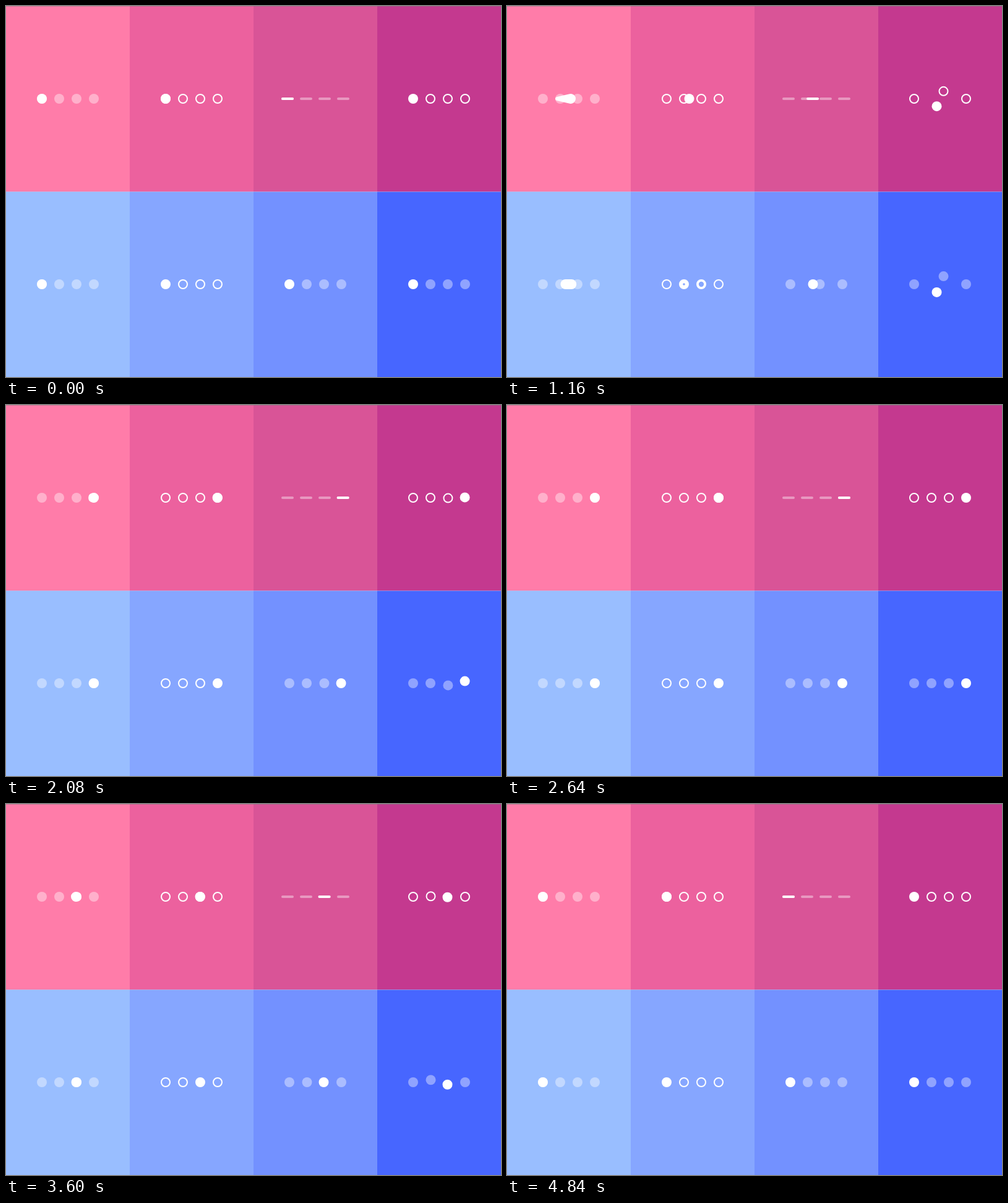
An HTML page for the animation above (4880 ms loop, 800 px wide and 600 px high).

```html
<!DOCTYPE html>
<html lang="en">
<head>
<meta charset="utf-8">
<title>Pager dots</title>
<style>
  html, body { margin: 0; width: 100%; height: 100%; overflow: hidden; }
  svg { display: block; width: 800px; height: 600px; }
</style>
</head>
<body>
<svg id="stage" viewBox="0 0 800 600"></svg>
<script>
const LOOP = 4880, MOVE = 382, GAP = 28, R = 8;
const STARTS = [309, 1019, 1729, 2858, 3568, 4278];
const STOPS = [0, 1, 2, 3, 2, 1, 0];
const UP = [-1, 1, -1, -1, 1, -1];
const COLORS = ['#ff7ca9', '#ec619e', '#d95497', '#c4398f',
                '#99beff', '#86a6ff', '#7391ff', '#4766ff'];
const DIM = { fill: '#fff', 'fill-opacity': 0.4 };
const FULL = { fill: '#fff' };
const RING = { fill: 'none', stroke: '#fff', 'stroke-width': 2 };
const stage = document.getElementById('stage');

function set(el, attrs) {
  for (const k in attrs) el.setAttribute(k, attrs[k]);
  return el;
}
function add(tag, ...attrs) {
  const el = document.createElementNS('http://www.w3.org/2000/svg', tag);
  attrs.forEach(a => set(el, a));
  return stage.appendChild(el);
}
const spot = (panel, i) => (panel % 4) * 200 + 58 + i * GAP;
const row = panel => panel < 4 ? 150 : 450;
const dot = (panel, i, style) =>
  add('circle', { cx: spot(panel, i), cy: row(panel), r: style === RING ? R - 1 : R }, style);
const dots = (panel, style, n = 4) =>
  Array.from({ length: n }, (_, i) => dot(panel, i, style));

COLORS.forEach((fill, i) =>
  add('rect', { x: i % 4 * 200, y: i < 4 ? 0 : 300, width: 200, height: 300, fill }));
add('rect', { width: 800, height: 1, fill: '#808080', 'fill-opacity': 0.5 });
add('rect', { y: 300, width: 800, height: 1, fill: '#d8b4dc', 'fill-opacity': 0.5 });

// Head runs ahead in the first half, the thin tail catches up in the second.
function comet(panel) {
  dots(panel, DIM);
  const body = add('path', FULL);
  return m => {
    const dir = m.b - m.a;
    const head = spot(panel, m.a) + dir * GAP * Math.min(1, 2 * m.u);
    const r = R - 5 * Math.min(1, m.tent * 1.6);
    const len = GAP * m.tent + R - r;
    const c = len > 1e-6 ? (R - r) / len : 0, s = Math.sqrt(1 - c * c);
    set(body, {
      transform: `translate(${head} ${row(panel)}) scale(${dir} 1)`,
      d: `M${-len - r * c} ${-r * s}L${-R * c} ${-R * s}` +
         `A${R} ${R} 0 1 1 ${-R * c} ${R * s}L${-len - r * c} ${r * s}` +
         `A${r} ${r} 0 0 1 ${-len - r * c} ${-r * s}Z`
    });
  };
}

function slide(panel) {
  dots(panel, RING);
  const ball = dot(panel, 0, FULL);
  return m => set(ball, { cx: spot(panel, m.pos) });
}

function bars(panel) {
  const x = i => panel * 200 + 45 + i * 30;
  const bar = (i, style) => add('rect',
    { x: x(i), y: row(panel) - 2, width: 20, height: 4, rx: 2 }, style);
  for (let i = 0; i < 4; i++) bar(i, DIM);
  const active = bar(0, FULL);
  return m => set(active, { x: x(m.pos) });
}

function pill(panel) {
  dots(panel, DIM);
  const body = add('rect', { y: row(panel) - R, height: 2 * R, rx: R }, FULL);
  return m => set(body, { x: spot(panel, m.pos) - R, width: 2 * R * (1 + m.tent) });
}

// Rings thicken inward until solid.
function fill(panel) {
  const rings = dots(panel, RING);
  return m => rings.forEach((ring, i) => {
    const on = i === m.b ? m.u : i === m.a ? 1 - m.u : 0;
    const hole = 6 * (1 - on);
    set(ring, { r: (R + hole) / 2, 'stroke-width': R - hole });
  });
}

// The active dot trades places with its neighbour; lift gives the height.
function swap(panel, style, lift) {
  const rest = dots(panel, style, 3), ball = dot(panel, 0, FULL);
  return m => {
    const y = lift(m) * m.side;
    const idle = [0, 1, 2, 3].filter(i => i !== m.a && i !== m.b);
    set(rest[0], { cx: spot(panel, m.a + m.b - m.pos), cy: row(panel) - y });
    idle.forEach((i, k) => set(rest[k + 1], { cx: spot(panel, i) }));
    set(ball, { cx: spot(panel, m.pos), cy: row(panel) + y });
  };
}

const pagers = [
  comet(0), slide(1), bars(2), swap(3, RING, m => 20 * m.tent),
  pill(4), fill(5), swap(6, DIM, () => 0), swap(7, DIM, m => 14 * Math.sin(Math.PI * m.p))
];

function moveAt(t) {
  let i = 0;
  while (i < 5 && t >= STARTS[i + 1]) i++;
  const p = Math.min(1, Math.max(0, (t - STARTS[i]) / MOVE));
  const u = (1 - Math.cos(Math.PI * p)) / 2;
  const a = STOPS[i], b = STOPS[i + 1];
  return { a, b, p, u, pos: a + (b - a) * u, tent: 1 - Math.abs(2 * u - 1), side: UP[i] };
}

function draw() {
  const m = moveAt(performance.now() % LOOP);
  pagers.forEach(update => update(m));
  requestAnimationFrame(draw);
}
draw();
</script>
</body>
</html>
```
